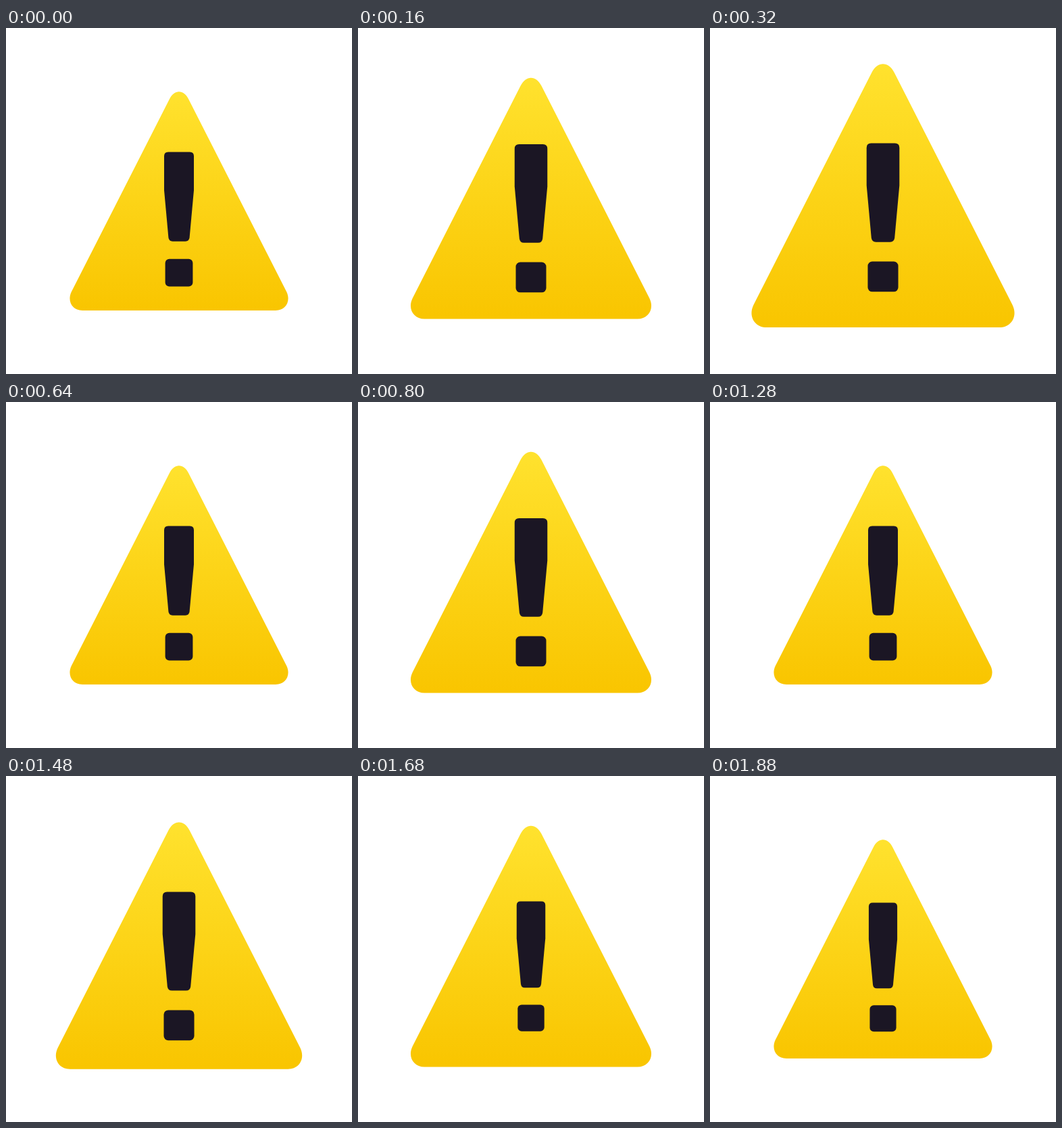
Animation, 512 px wide and 512 px high, one loop 1.92 s. Source, as an HTML page:

```html
<!DOCTYPE html>
<html lang="en">
<head>
<meta charset="utf-8">
<title>Warning sign</title>
<style>
  html, body { margin: 0; width: 100%; height: 100%; overflow: hidden; background: #fff; }
  svg { display: block; width: 100%; height: 100%; }
</style>
</head>
<body>
<svg viewBox="0 0 512 512">
  <defs>
    <linearGradient id="gold" x1="0" y1="0" x2="0" y2="1">
      <stop offset="0" stop-color="#ffe22e"/>
      <stop offset="1" stop-color="#f9c500"/>
    </linearGradient>
  </defs>
  <g id="sign">
    <path fill="url(#gold)" d="M242 105C249 90.5 263 90.5 270 105L415 390C422 404 414 418 399 418H113C98 418 90 404 97 390Z"/>
    <g id="mark" fill="#1b1624">
      <path d="M240 183.4H272Q278 183.4 278 189.4V240L271.6 310Q271 315.7 265.5 315.7H246.5Q241 315.7 240.4 310L234 240V189.4Q234 183.4 240 183.4Z"/>
      <rect x="235.6" y="341.8" width="40.8" height="40.6" rx="6"/>
    </g>
  </g>
</svg>
<script>
  const PERIOD = 640, STEP = 40;
  const sign = document.getElementById("sign");
  const mark = document.getElementById("mark");

  // Rises for 320 ms, falls for 160 ms, rests for 160 ms.
  const pulse = t => {
    t = (t + PERIOD) % PERIOD;
    return t < 320 ? t / 320 : Math.max(0, (480 - t) / 160);
  };

  const scaleAbout = (node, y, s) =>
    node.setAttribute("transform", `translate(256 ${y}) scale(${s}) translate(-256 ${-y})`);

  function draw(time) {
    const t = Math.floor(time / STEP) * STEP % PERIOD;
    scaleAbout(sign, 295, 1 + 0.204 * pulse(t));
    scaleAbout(mark, 282.9, 1 - 0.165 * pulse(t - 160));
  }

  const start = performance.now();
  function tick() {
    draw(performance.now() - start);
    requestAnimationFrame(tick);
  }
  tick();
</script>
</body>
</html>
```
